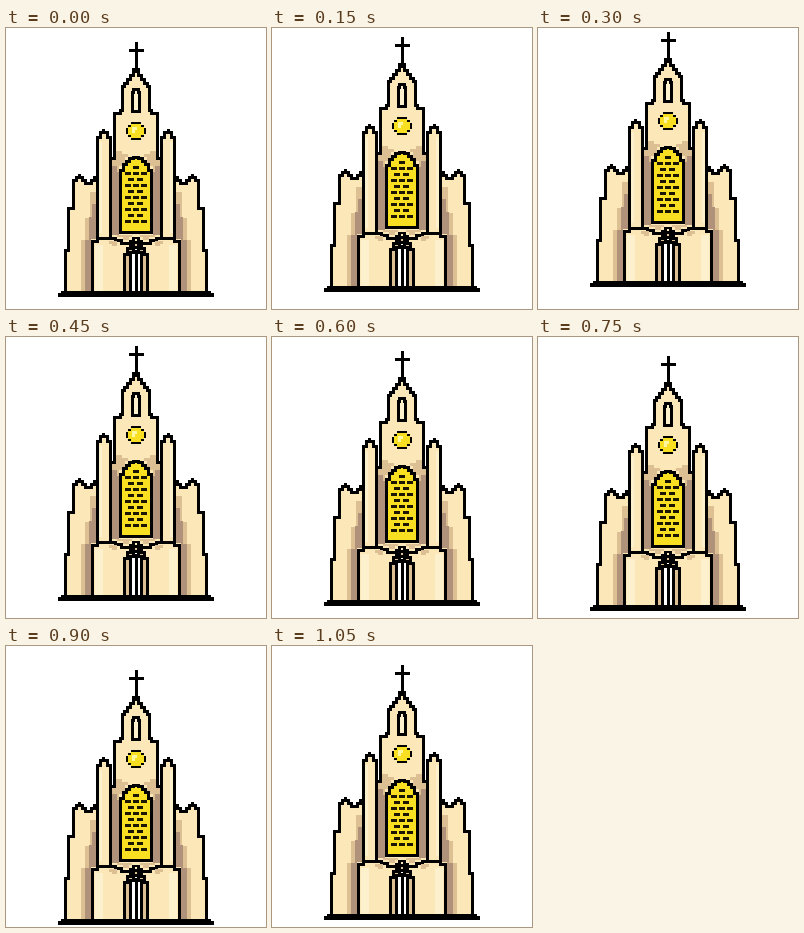
An HTML page for the animation above (1.2 s loop, 260 by 281 pixels).

```html
<!DOCTYPE html>
<html lang="en">
<head>
<meta charset="utf-8">
<title>Floating church</title>
<style>
  html, body { margin: 0; width: 100%; height: 100%; overflow: hidden; background: #fff; }
  svg { display: block; width: 260px; height: 281px; shape-rendering: crispEdges; }
  .wall { fill: #fbe7b8; }
  .line { stroke: #000; stroke-width: 3; }
  .bare { fill: none; }
  .light { fill: #fdf0cd; }
  .tan { fill: #dcc093; }
  .brown { fill: #b0927a; }
  .gold { fill: #f9df22; }
</style>
</head>
<body>
<svg viewBox="0 0 260 281">
  <g id="church">
    <g id="half">
      <!-- side tower -->
      <path class="wall line" d="M73.5 146V149.5H70.5V152.5H67.5V180.5H62.5V222.5H59.5V265H93V149.5H88.5V152.5H85.5V155.5H79.5V152.5H76.5V149.5H73.5"/>
      <path class="tan" d="M84 164H90V210H85V265H75V212H79V190H84Z"/>
      <path class="brown" d="M86 176H90V211H85V265H79V212H83V189H86Z"/>

      <!-- central tower -->
      <path class="wall line" d="M130 41.5H127.5V47.5H124.5V51.5H121.5V55.5H118.5V58.5H116.5V82.5H114.5V85.5H108.5V130H105V265H130"/>
      <path class="tan" d="M110 123H116V126H122V129H119V138H113V207H105V132H110Z"/>
      <path class="brown" d="M105 138H111V144H113V207H105Z"/>

      <!-- pinnacle -->
      <path class="wall line" d="M97.5 101V104.5H94.5V109.5H91.5V211H104.5V109.5H101.5V104.5H97.5"/>
      <path class="light" d="M93 114H96V205H93Z"/>

      <!-- buttress and gable -->
      <path class="wall line" d="M130 209.5H127.5V212.5H124.5V215.5H115.5V212.5H109.5V210.5H91.5V213.5H86.5V265H118.5"/>
      <path class="wall" d="M106 207H130V209H126V212H123V214H117V211H111V209H106Z"/>
      <path class="tan" d="M111 207H126V209H123V212H117V209H111ZM103 213H111V218H106V216H103Z"/>
      <path class="light" d="M89 217H97V263H89Z"/>

      <!-- doorway -->
      <path class="line tan" d="M130 214.5H127.5V217.5H124.5V220.5H121.5V226.5H118.5V265H130"/>
      <path class="line" fill="#fff" d="M130 219.5H127.5V224.5H124.5V265H130"/>
    </g>
    <use href="#half" transform="matrix(-1 0 0 1 260 0)"/>

    <path class="line bare" d="M130 14V45M122.5 22.5H137.5M130 222V265"/>
    <path class="line light" d="M130 61.5H127.5V64.5H126.5V83.5H133.5V64.5H132.5V61.5H130"/>

    <!-- round window -->
    <path d="M125 94H135V97H138V100H140V106H138V109H135V112H125V109H122V106H120V100H122V97H125Z"/>
    <path class="gold" d="M125 96H135V99H138V107H135V110H125V107H122V99H125Z"/>
    <path fill="#fff6a0" d="M126 99H131V102H129V105H126Z"/>

    <!-- arched window -->
    <path class="gold line" d="M130 129.5H127.5V130.5H123.5V133.5H120.5V136.5H117.5V142.5H114.5V204.5H145.5V142.5H142.5V136.5H139.5V133.5H136.5V130.5H132.5V129.5H130"/>
    <g id="bricks"></g>

    <path d="M55 263H205V265H208V269H52V265H55Z"/>
  </g>
</svg>
<script>
  const church = document.getElementById('church');

  let dashes = 'M127 139.5h6';
  for (let row = 0; row < 9; row++) {
    const y = 145.5 + row * 6;
    dashes += row % 2
      ? `M122 ${y}h6M131 ${y}h6`
      : `M119 ${y}h6M127 ${y}h6M135 ${y}h6`;
  }
  document.getElementById('bricks').innerHTML =
    `<path d="${dashes}" fill="none" stroke="#1c1600" stroke-width="3"/>`;

  // Triangle wave in eight held steps: up 10px, back, then down 10px.
  function draw(now) {
    const step = Math.floor(now / 150) % 8;
    const y = 5 * (2 - Math.abs((step + 6) % 8 - 4));
    church.setAttribute('transform', `translate(0 ${y})`);
    requestAnimationFrame(() => draw(performance.now() - start));
  }
  const start = performance.now();
  draw(0);
</script>
</body>
</html>
```
